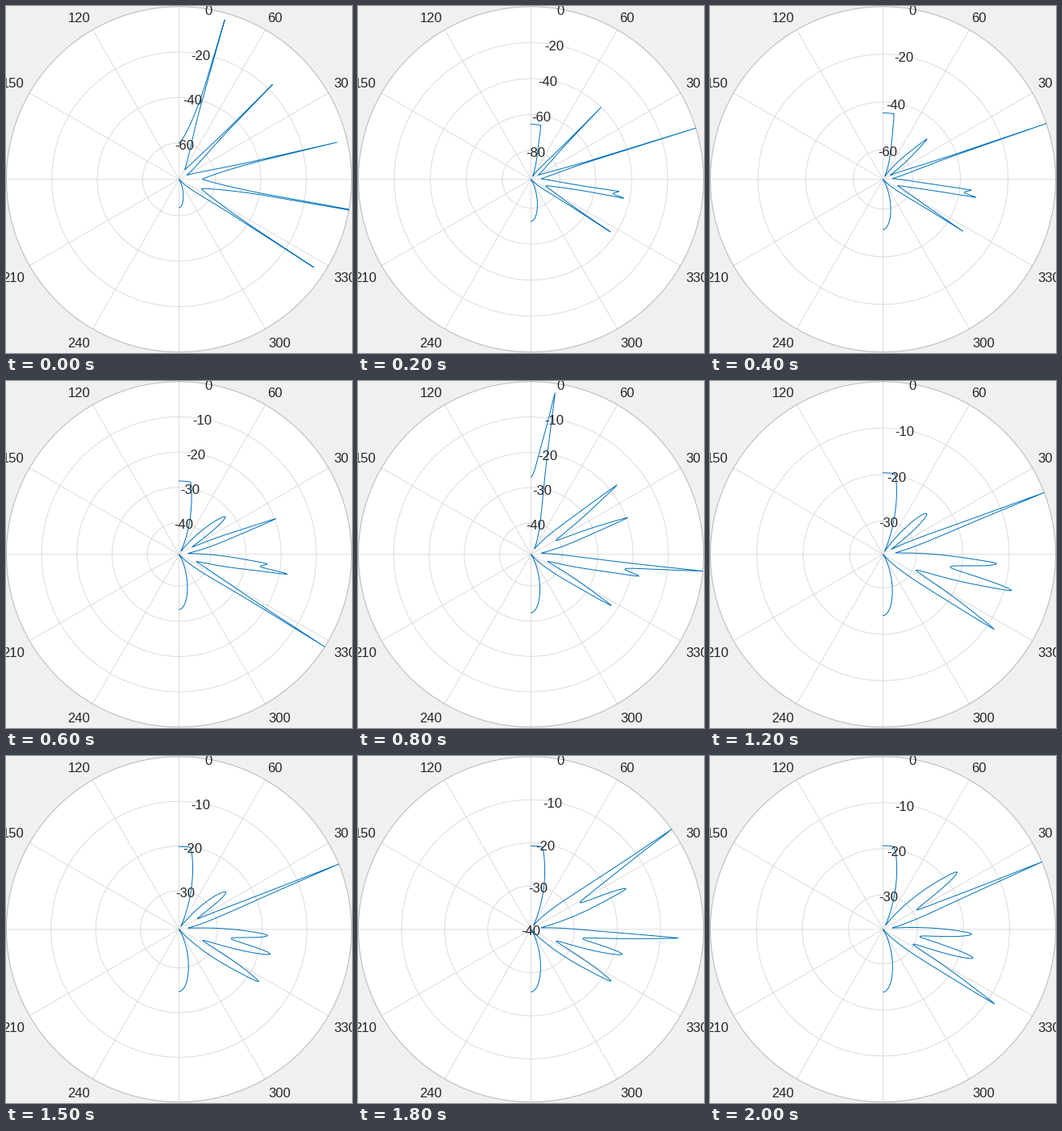
A matplotlib script for the animation above (2100 ms loop, 429 by 430 pixels).

```python
import numpy as np
import matplotlib.pyplot as plt
from matplotlib.animation import FuncAnimation
from matplotlib.patches import Circle

W, H, DPI = 429, 430, 64
FRAMES, INTERVAL = 21, 100
PX = 72 / DPI
CX, CY, R = 214.5, 214.8, 214
FONT = 16.67
BLUE, INK, GRID = "#0072BD", "#262626", "#dcdcdc"
TICK_ANGLE = np.radians(80)
NULL_ANGLE = -51

# Sources: first and last angle, easing power, sway, resting radius,
# and bursts as {frame: strength}.
SOURCES = [
    (-32.7, -33.7, 1, -0.7, 118, {0: 0.85, 6: 1, 12: 0.5, 20: 0.5}),
    (-9.3, -17.5, 1, -1.5, 117, {0: 1, 7: 0.4, 12: 0.5}),
    (-10, -3, 0.5, 0, 110, {0: 1, 8: 1, 12: 0.3, 18: 0.7}),
    (13.5, 23, 0.35, -0.5, 128, {0: 0.85, 2: 1, 12: 1, 20: 1}),
    (43.5, 37.5, 1, 3, 74, {0: 0.65, 2: 0.36, 8: 0.45, 18: 1, 20: 0.3}),
    (74, 83, 0.2, 0, 95, {0: 0.95, 8: 0.9}),
]


def settle(i, start, end, tau=4):
    return end + (start - end) * np.exp(-i / tau)


def depth(i):
    """Range in dB from the rim to the centre."""
    return np.interp(i, [0, 2, 6, 8, 12, 18, 20],
                     [76, 96, 49, 48.9, 37.2, 40.05, 37.5])


def direction(source, i):
    first, last, power, sway = source[:4]
    wave = np.cos(2 * np.pi * (i - 1.5) / 10.5)
    return first + (last - first) * (i / (FRAMES - 1)) ** power + sway * wave


def height(rest, bursts, i):
    gain = max(s * max(0, 1 - abs(i - f) / 2) for f, s in bursts.items())
    return rest + (R - rest) * gain


def climb(t, db):
    """Share of the way from a dip (t=0) up to a peak (t=1) db higher."""
    soft = 0.5 - 0.5 * np.cos(np.pi * t ** 1.2)
    if db < 10:
        return soft
    eps = 1 / (10 ** (db / 10) - 1)
    sharp = -10 * np.log10(((1 - t ** 1.4) ** 2 + eps) / (1 + eps)) / db
    mix = min((db - 10) / 20, 1)
    return soft + (sharp - soft) * mix


def anchors(i):
    """Angles and radii of the ends, the null, the peaks and their dips."""
    bottom, top = settle(i, 35, 78), settle(i, 45, 104)
    peak_a = np.array([direction(s, i) for s in SOURCES])
    rests = [s[4] for s in SOURCES[:-1]] + [top]
    peak_r = np.array([height(r, s[5], i) for r, s in zip(rests, SOURCES)])
    peak_r[peak_r.argmax()] = R

    # Closer neighbours merge, so the dip between them gets shallower.
    gap = np.diff(peak_a)
    dip_a = peak_a[:-1] + 0.45 * gap
    dip_r = (np.minimum(peak_r[:-1], peak_r[1:])
             * (0.06 + 0.94 * np.exp(-(gap / 15) ** 2)))

    angle = np.concatenate([peak_a, dip_a])
    order = np.argsort(angle, kind="stable")
    radius = np.concatenate([peak_r, dip_r])[order]
    return (np.concatenate([[-90, NULL_ANGLE], angle[order], [90]]),
            np.concatenate([[bottom, 0], radius, [top]]))


def spectrum(i):
    angle, radius = anchors(i)
    t = np.linspace(0, 1, 31)
    theta, rad = [], []
    for n in range(len(angle) - 1):
        a, b = radius[n:n + 2]
        # The tail before the null has no peak and stays round.
        db = abs(b - a) * depth(i) / R if n else 0
        up = climb(t, db) if b >= a else climb(1 - t, db)
        theta.append(angle[n] + (angle[n + 1] - angle[n]) * t)
        rad.append(min(a, b) + abs(b - a) * up)
    return np.radians(np.concatenate(theta)), np.concatenate(rad)


def label(x, y, text=""):
    return ax.text(x, y + 0.36 * FONT, text, ha="center", va="baseline",
                   fontsize=FONT * PX, family="Liberation Sans",
                   color=INK, zorder=5)


def ring(radius, color, zorder):
    return ax.add_patch(Circle((CX, CY), radius, fc="none", ec=color,
                               lw=PX, zorder=zorder))


fig = plt.figure(figsize=(W / DPI, H / DPI), dpi=DPI, facecolor="#f0f0f0")
ax = fig.add_axes([0, 0, 1, 1])
ax.set_xlim(0, W)
ax.set_ylim(H, 0)
ax.axis("off")

ax.add_patch(Circle((CX, CY), R, fc="white", ec="none", zorder=0))
for a in np.radians(np.arange(0, 180, 30)):
    dx, dy = R * np.cos(a), R * np.sin(a)
    ax.plot([CX - dx, CX + dx], [CY + dy, CY - dy], color=GRID,
            lw=PX, zorder=1, snap=False)
ring(R, "#b8b8b8", 2)

for text, x, y in [("30", 416, 95), ("60", 333, 14), ("120", 90.5, 14),
                   ("150", 9, 95), ("210", 9, 336), ("240", 90.5, 417),
                   ("300", 339, 417), ("330", 420, 336)]:
    label(x, y, text)
label(251.3, 5, "0")

rings = [ring(1, GRID, 1) for _ in range(5)]
ticks = [label(CX, CY) for _ in rings]
curve, = ax.plot([], [], color=BLUE, lw=PX, zorder=3,
                 solid_joinstyle="round")


def update(i):
    theta, rad = spectrum(i)
    curve.set_data(CX + rad * np.cos(theta), CY - rad * np.sin(theta))
    floor = depth(i)
    step = 20 if floor > 58 else 10
    for n, (circle, tick) in enumerate(zip(rings, ticks), 1):
        r = R * (1 - n * step / floor)
        circle.set_visible(r >= 0)
        tick.set_visible(r >= 0)
        circle.set_radius(max(r, 0))
        tick.set_position((CX - 0.7 + r * np.cos(TICK_ANGLE),
                           CY + 1.3 - r * np.sin(TICK_ANGLE) + 0.36 * FONT))
        tick.set_text(f"-{n * step}")
    return [curve, *rings, *ticks]


anim = FuncAnimation(fig, update, frames=FRAMES, interval=INTERVAL,
                     repeat=True, repeat_delay=0, blit=False)
plt.show()
```
